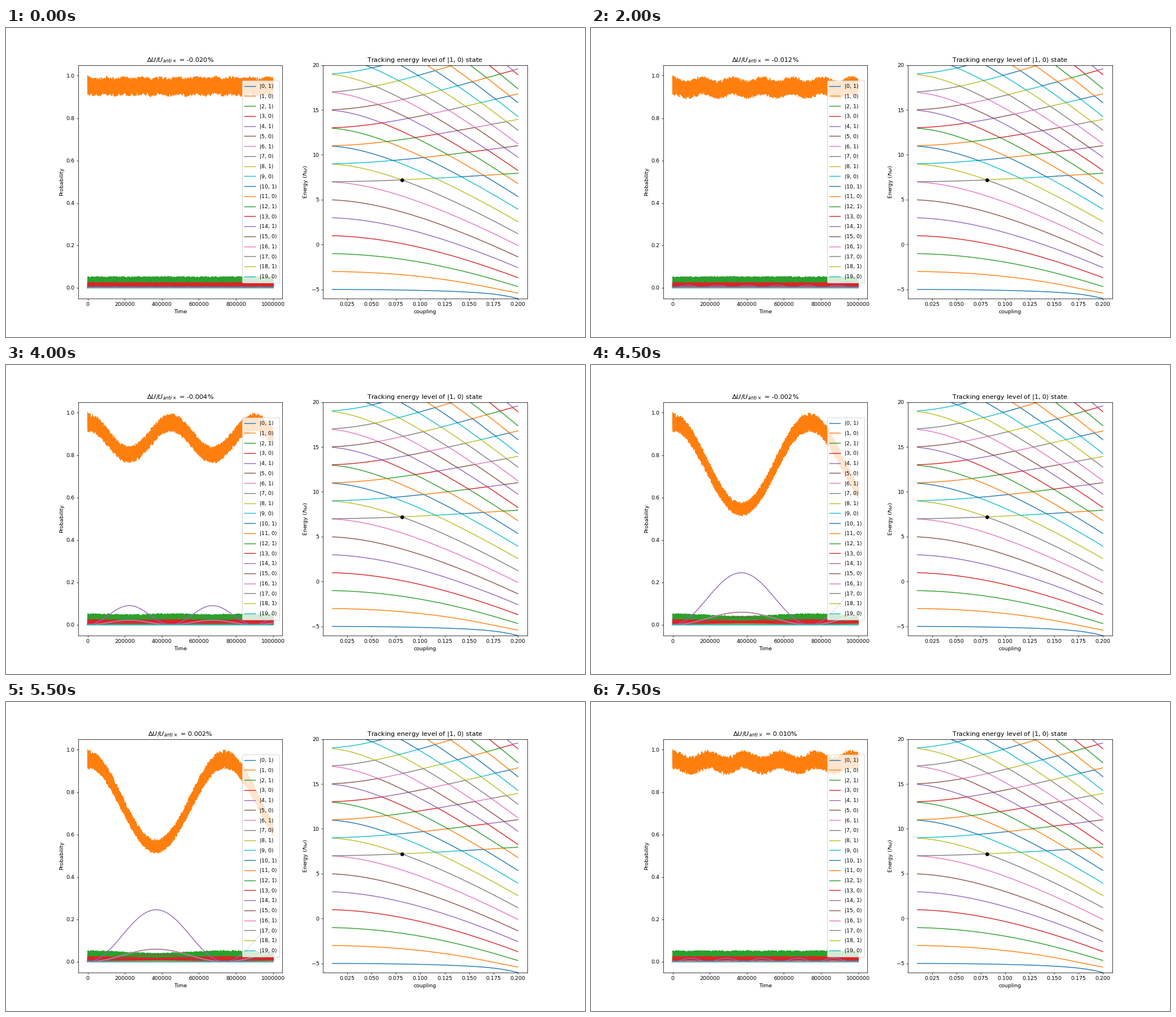
These frames come from a looping animation (1025x547 px, 8000 ms). A matplotlib script:

```python
import numpy as np
import matplotlib
import matplotlib.pyplot as plt
from matplotlib.animation import FuncAnimation

matplotlib.rcParams.update({
    "font.family": "DejaVu Sans",
    "font.size": 10,
    "agg.path.chunksize": 20000,
})

W, H = 1025, 547
DPI = W / 15            # a 15-inch wide figure
FRAMES, INTERVAL = 16, 500
SPLITTING = 11.0        # two-level splitting in units of hbar omega
DIM, SHOWN = 60, 20     # states in the parity chain, states plotted
T_MAX, SAMPLES = 1e6, 10000
GAP = 2 * np.pi * 0.886e-6       # resonant oscillation rate
SLOPE = 2 * np.pi * 0.511e-3     # detuning rate per percent


def hamiltonian(coupling):
    """Rabi model restricted to the chain |0,1>, |1,0>, |2,1>, ..."""
    n = np.arange(DIM)
    spin = np.where(n % 2, 1, -1)
    hop = coupling * SPLITTING * np.sqrt(n[1:])
    return np.diag(n + 0.5 + spin * SPLITTING / 2) + np.diag(hop, 1) + np.diag(hop, -1)


def find_crossing(lo, hi):
    """Coupling at which levels 7 and 8 exchange character."""
    for _ in range(14):
        mid = (lo + hi) / 2
        vec = np.linalg.eigh(hamiltonian(mid))[1]
        if abs(vec[1, 7]) > abs(vec[1, 8]):
            lo = mid
        else:
            hi = mid
    return (lo + hi) / 2


crossing = find_crossing(0.076, 0.086)
energy, vec = np.linalg.eigh(hamiltonian(crossing - 1e-4))

# Rotate the resonant pair so that only one member overlaps |1,0>
start = vec[:, 7] * vec[1, 7] + vec[:, 8] * vec[1, 8]
partner = vec[:, 8] * vec[1, 7] - vec[:, 7] * vec[1, 8]

rng = np.random.default_rng(4)
step = T_MAX / SAMPLES
time = np.arange(SAMPLES) * step + rng.uniform(0, step, SAMPLES)
time[0] = 0

# Fast background from every level outside the resonant pair
others = [k for k in range(DIM) if k not in (7, 8)]
phases = np.exp(-1j * np.outer(energy[others] - energy[7], time))
fast = (vec[:SHOWN, others] * vec[1, others]) @ phases


def probabilities(percent):
    detuning = SLOPE * percent
    rate = np.hypot(GAP, detuning)
    c, s = np.cos(rate * time / 2), np.sin(rate * time / 2)
    stay = c + 1j * detuning / rate * s
    move = -1j * GAP / rate * s
    psi = fast + np.outer(start[:SHOWN], stay) + np.outer(partner[:SHOWN], move)
    return np.abs(psi) ** 2


fig, (left, right) = plt.subplots(
    1, 2, figsize=(W / DPI + 1e-9, H / DPI + 1e-9), dpi=DPI, facecolor="white")
fig.subplots_adjust(left=0.125, right=0.9, bottom=0.125, top=0.88, wspace=0.2)

lines = [left.plot([], [], lw=1.5, label=rf"|{n}, {(n + 1) % 2}$\rangle$")[0]
         for n in range(SHOWN)]
left.set_xlim(-0.05 * T_MAX, 1.05 * T_MAX)
left.set_ylim(-0.05, 1.05)
left.ticklabel_format(axis="x", style="plain")
left.set_xlabel("Time")
left.set_ylabel("Probability")
left.legend(loc="center right")
title = left.set_title("")

couplings = np.linspace(0.01, 0.2, 100)
levels = np.array([np.linalg.eigvalsh(hamiltonian(g)) for g in couplings])
right.plot(couplings, levels[:, :32], lw=1.5)
right.plot(crossing, energy[7], "o", color="black", ms=6)
right.set_xlim(0.0005, 0.2095)
right.set_ylim(-6, 20)
right.set_xlabel("coupling")
right.set_ylabel(r"Energy ($\hbar\omega$)")
right.set_title(r"Tracking energy level of |1, 0$\rangle$ state")


def update(i):
    percent = (i - 10) * 0.002
    for line, prob in zip(lines, probabilities(percent)):
        line.set_data(time, prob)
    title.set_text(rf"$\Delta U/U_{{anti\times}}$ = {percent:.3f}%")
    return [*lines, title]


anim = FuncAnimation(fig, update, frames=FRAMES, interval=INTERVAL,
                     blit=False, repeat=True)
plt.show()
```
